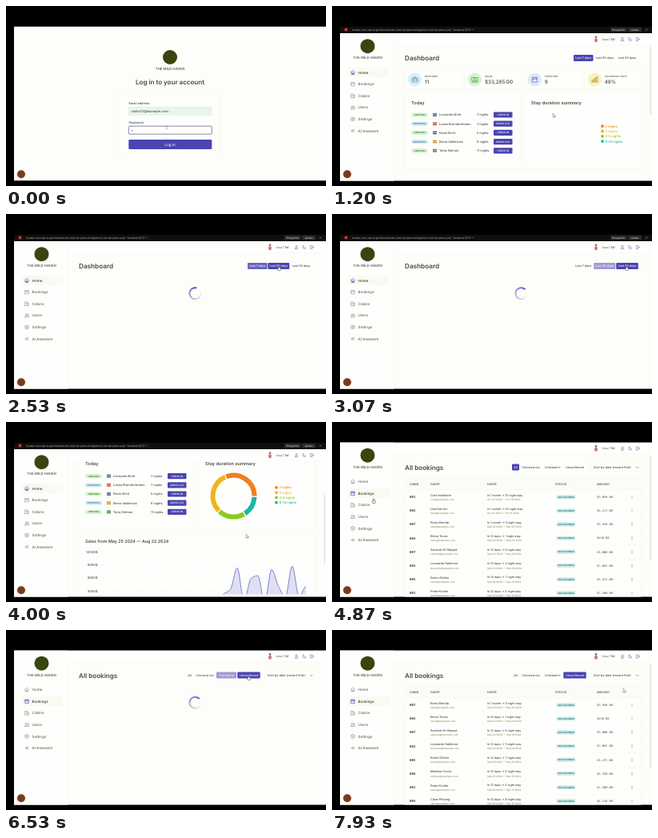
An HTML page for the animation above (8 s loop, 400 by 225 pixels).

```html
<!DOCTYPE html>
<html lang="en">
<head>
<meta charset="utf-8">
<title>Hotel dashboard</title>
<style>
html, body { margin: 0; width: 100%; height: 100%; overflow: hidden; background: #000; }
svg { display: block; width: 100vw; height: 100vh; font-family: Inter, "Open Sans", sans-serif; text-rendering: geometricPrecision; }
.mono { font-family: "Noto Sans Mono", "DejaVu Sans Mono", monospace; }
</style>
</head>
<body>
<script>
const LOOP = 8000, INK = '#4a4a46', SOFT = '#8c8c66', BRAND = '#4a44b0';
const PAGE = '#fdfdf9', CARD = '#fefefc', LINE = '#f5f5ec';

const text = (x, cy, size, str, o = {}) =>
  `<text x="${x}" y="${cy + size * .36}" font-size="${size}" fill="${o.fill || INK}" font-weight="${o.w || 500}"` +
  ` text-anchor="${o.a || 'start'}" class="${o.c || ''}" id="${o.id || ''}">${str}</text>`;
const rect = (x, y, w, h, fill, r = 0, more = '') =>
  `<rect x="${x}" y="${y}" width="${w}" height="${h}" rx="${r}" fill="${fill}" ${more}/>`;
const dot = (x, y, r, fill, more = '') => `<circle cx="${x}" cy="${y}" r="${r}" fill="${fill}" ${more}/>`;
const icon = (x, y, d, color, k = 1) =>
  `<path transform="translate(${x} ${y}) scale(${k})" d="${d}" fill="none" stroke="${color}" stroke-width="${.65 / k}" stroke-linejoin="round"/>`;
const group = (id, body, more = '') => `<g id="${id}" ${more}>${body}</g>`;

const ICONS = {
  home: 'M-2.6 0L0-2.5 2.6 0M-1.9-.5V2.4H1.9V-.5M-.5 2.4V.8H.5V2.4',
  calendar: 'M-2.3-1.9H2.3V2.3H-2.3ZM-2.3-.5H2.3M-1.2-2.6V-1.5M1.2-2.6V-1.5',
  cabin: 'M-2.4 2.4V-2.2H.8V2.4M.8-.8H2.4V2.4H-2.8M-1.3-1H-.4M-1.3.4H-.4',
  users: 'M-.9-2.2a1.1 1.1 0 1 0 .1 0M-2.7 2.2C-2.7-.1.9-.1.9 2.2ZM1.5-1.6a.8.8 0 1 0 .1 0M1.6.5C2.6.5 2.8 1.4 2.8 2.2H1.5',
  gear: 'M0-1a1 1 0 1 0 .1 0M-.5-2.5H.5L1-1.7 2-1.7 2.5-.6 2 0 2.5.6 2 1.7 1 1.7.5 2.5H-.5L-1 1.7-2 1.7-2.5.6-2 0-2.5-.6-2-1.7-1-1.7Z',
  share: 'M1.9-2L-2 0 1.9 2M-2 0H2.4',
  bag: 'M-2.5-1.3H2.5V2.2H-2.5ZM-1-1.3V-2.3H1V-1.3M-2.5.3H2.5',
  cash: 'M-2.8-1.9H2.8V1.3H-2.8ZM0-1.1a.8.8 0 1 0 .1 0M-2.8 2.4H2.8',
  bars: 'M-2.6 2.3V.5H-1.2V2.3ZM-.7 2.3V-.8H.7V2.3ZM1.2 2.3V-2.3H2.6V2.3Z',
  user: 'M0-2.2a1.1 1.1 0 1 0 .1 0M-1.8 2.2C-1.8-.2 1.8-.2 1.8 2.2Z',
  moon: 'M-.6-2.2A2.2 2.2 0 1 0 2.2.7 2.2 2.2 0 0 1-.6-2.2Z',
  exit: 'M.6-1V-2H-2V2H.6V1M-.8 0H2.4M1.5-.9L2.4 0 1.5.9'
};

const brand = (x, y) => dot(x, y, 9, '#39450f') +
  text(x, y + 14.6, 4.3, 'THE MILD HAVEN', { a: 'middle', w: 500 });

// login
const login = rect(10, 25.5, 390, 193, PAGE) + brand(205, 64) +
  text(205, 95.5, 8, 'Log in to your account', { a: 'middle', w: 600 }) +
  rect(142, 110, 126, 77.5, CARD, 1.5, `stroke="${LINE}" stroke-width=".5"`) +
  text(153.5, 121.7, 3.9, 'Email address') +
  rect(153.3, 126, 104, 10.5, '#e9f5e8', 1.2, 'stroke="#e4e4d8" stroke-width=".4"') +
  text(156.5, 131.4, 4.1, 'visitor12@example.com') +
  text(153.5, 145.3, 3.9, 'Password') +
  rect(153.3, 150.2, 104, 10, '#fff', 1.2, 'id="pwBox" stroke-width=".8"') +
  text(156.5, 155.4, 4.4, '', { id: 'pw' }) +
  rect(153.3, 167, 104, 12, BRAND, 1.2) +
  text(205, 173, 4.6, 'Log in', { a: 'middle', fill: '#f4f4ee', id: 'logBtn' }) +
  '<circle id="logSpin" cx="205" cy="173" r="2.6" fill="none" stroke="#eee" stroke-width=".8" stroke-dasharray="11 6"/>';

// sidebar and top bar
const NAV = [['Home', 'home'], ['Bookings', 'calendar'], ['Cabins', 'cabin'], ['Users', 'users'], ['Settings', 'gear'], ['AI Assistant', 'share']];
const navY = i => 83 + i * 14.6;
const nav = on => rect(19.5, navY(on) - 6.2, 52, 12.4, '#fafaf2', 1.5) + NAV.map(([name, ic], i) =>
  icon(26, navY(i), ICONS[ic], i === on ? BRAND : '#96969a') +
  text(32.6, navY(i), 4.5, name, { fill: i === on ? '#3a3a36' : '#66665c' })).join('');
const shell = rect(10, 34, 390, 195, PAGE) + rect(10, 34, 390, 14.5, CARD) + rect(10, 34, 67, 195, CARD) +
  rect(77, 48.3, 323, .5, LINE) + rect(77, 34, .5, 195, LINE) + brand(44.5, 50.2) +
  dot(330, 38.8, 1.4, '#b5566a') + rect(328.2, 40.4, 3.6, 4.8, '#c07a80', 1.4) +
  text(338, 41.5, 3.8, 'Lou / Tal') +
  ['user', 'moon', 'exit'].map((n, i) => icon(363 + i * 9.7, 41.5, ICONS[n], '#7c7cac')).join('') +
  group('navHome', nav(0)) + group('navBook', nav(1));

// filter rows: x, width, label
const DAYS = [[302, 24.5, 'Last 7 days'], [327.3, 27, 'Last 30 days'], [355.2, 27.6, 'Last 90 days']];
const KINDS = [[225, 9, 'All'], [235.3, 26.4, 'Checked out'], [263, 25.2, 'Checked in'], [289.3, 28.4, 'Unconfirmed']];
const filter = (id, list, y) => rect(list[0][0] - 1, y - 5, list.at(-1)[0] + list.at(-1)[1] - list[0][0] + 2, 10, CARD, 1) +
  list.map(([x, w, s], i) => rect(x, y - 4, w, 8, BRAND, 1, `id="${id}${i}"`) +
    text(x + w / 2, y, 3.7, s, { a: 'middle', id: `${id}T${i}` })).join('');

// dashboard
const box = (x, y, w, h) => rect(x, y, w, h, CARD, 1.5, `stroke="${LINE}" stroke-width=".5"`);
const STATS = [['BOOKINGS', 'bag', '#d9eef6', '#2f7fa8'], ['SALES', 'cash', '#d5f5cd', '#2c8a45'],
  ['CHECK INS', 'calendar', '#dcecf4', '#4a5aa6'], ['OCCUPANCY RATE', 'bars', '#f8f2bd', '#b07a1c']];
const stats = STATS.map(([name, ic, bg, fg], i) => {
  const x = 91 + i * 74.9;
  return box(x, 80.5, 70.5, 23) + dot(x + 12.6, 92, 8.6, bg) + icon(x + 12.6, 92, ICONS[ic], fg, 1.35) +
    text(x + 25, 87.8, 3, name, { w: 600, fill: '#6a6a58' }) + text(x + 25, 94.4, 6.3, '', { id: 'stat' + i });
}).join('');
const TODAY = [['Leonardo Brint', 7, '#2d4a8e'], ['Lukas Brennhofmann', 7, '#c93a22'], ['Kevin Brint', 5, '#2d4a8e'],
  ['Elena Valderuez', 8, '#d08a1c'], ['Tariq Selmun', 11, '#2b7a3c']];
const today = TODAY.map(([name, nights, flag], i) => {
  const y = 136 + i * 11.2, out = i % 2;
  return rect(99, y - 2.6, 21, 5.2, out ? '#d3ecf4' : '#d5f3cc', 2.6) +
    text(109.5, y, 2.8, out ? 'DEPARTING' : 'ARRIVING', { a: 'middle', w: 600, fill: out ? '#2f7590' : '#3c8040' }) +
    rect(126, y - 1.8, 5, 3.6, flag) + rect(126, y - .5, 5, 1, '#e9dfc0') +
    text(134, y, 3.9, name) + text(181, y, 3.8, nights + ' nights') +
    rect(202, y - 3.6, 23.5, 7.2, BRAND, 1) +
    text(213.7, y, 3, out ? 'CHECK OUT' : 'CHECK IN', { a: 'middle', w: 600, fill: '#f4f4ee' }) +
    rect(99, y + 5.4, 127, .4, LINE);
}).join('');
const SLICES = [['2 nights', '#f08020', 6], ['3 nights', '#f0b41c', 6], ['4-5 nights', '#8ccc1c', 4], ['8-14 nights', '#1cb8a4', 3]];
const legend = SLICES.map(([s, c], i) => dot(338, 150.2 + i * 6.3, 1.9, c) + text(341.5, 150.2 + i * 6.3, 4, s, { fill: c })).join('');
const slices = SLICES.map(([, c], i) => `<path id="slice${i}" fill="none" stroke="${c}" stroke-width="6"/>`).join('');

const valueY = v => 296 - v * 65.3 / 12000;
function curve(vals) {
  const step = 258 / (vals.length - 1), p = vals.map((v, i) => [117 + i * step, valueY(v)]);
  const slope = i => {
    if (!p[i - 1] || !p[i + 1]) return 0;
    const a = p[i][1] - p[i - 1][1], b = p[i + 1][1] - p[i][1];
    return a * b > 0 ? 2 * a * b / (a + b) : 0;
  };
  return 'M' + p[0] + p.slice(1).map(([x, y], i) =>
    `C${x - step * 2 / 3} ${p[i][1] + slope(i) / 3} ${x - step / 3} ${y - slope(i + 1) / 3} ${x} ${y}`).join('');
}
const area = (vals, line, fill) => `<path d="${curve(vals)}L375 296H117Z" fill="${fill}"/>` +
  `<path d="${curve(vals)}" fill="none" stroke="${line}" stroke-width=".9"/>`;
const chart = (id, total, extra, ticks) => group(id, `<g clip-path="url(#grow)">` +
  area(total, '#7474cc', '#dfe0f4') + area(extra, '#2fb86c', '#d2f0da') + '</g>' +
  ticks.map((s, i) => text(117 + i * 258 / (ticks.length - 1), 300.2, 3.8, s, { a: 'middle' })).join(''));
const WEEK = [500, 5500, 1100, 8450, 4500, 2500, 10735], WEEK_X = [100, 450, 100, 100, 200, 300, 1200];
const LONG = Array.from({ length: 31 }, (_, i) => i < 18 ? 0 : Math.round(4500 + 4200 * Math.sin(i * 2.3)));
const grid = [0, 3000, 6000, 9000, 12000].map(v =>
  `<path d="M117 ${valueY(v)}H375" stroke="#e2e2d8" stroke-width=".4" stroke-dasharray="1.5 1.5"/>` +
  text(114.5, valueY(v), 4, v + '$', { a: 'end' })).join('');
const tip = '<path d="M375 230.7V296" stroke="#ccc" stroke-width=".4"/>' + dot(375, valueY(10735), 1.2, '#6a6ac4') +
  rect(326, 243, 45.5, 29.5, '#fefefb', 0, 'stroke="#ececdf" stroke-width=".4"') +
  text(329.5, 249.3, 4.2, 'Aug 22') + text(329.5, 256.4, 4.2, 'Total sales : 10735$', { fill: '#6c6cc0' }) +
  text(329.5, 265, 4.2, 'Extras sales : 1200$', { fill: '#2fae54' });
const dash = group('dashScroll',
  text(91, 65, 8.2, 'Dashboard', { w: 600 }) + filter('day', DAYS, 65) +
  group('dashData', stats + box(91, 107.5, 145.5, 95.5) + text(99, 120.6, 5.6, 'Today', { w: 600 }) + today +
    box(240.8, 107.5, 145.5, 95.5) + text(249, 120.6, 5.6, 'Stay duration summary', { w: 600 }) + legend + slices +
    box(91, 207.5, 295.3, 100) + text(99, 217.7, 5.35, '', { w: 600, id: 'salesTitle' }) + grid +
    chart('week', WEEK, WEEK_X, [16, 17, 18, 19, 20, 21, 22].map(d => 'Aug ' + d)) +
    chart('long', LONG, LONG.map(v => v / 9), ['May 25', 'Jun 14', 'Jul 04', 'Jul 24', 'Aug 22']) + group('tip', tip)));

// bookings: cabin, guest, mail, when, nights, dates, amount
const GUESTS = [
  ['001', 'Cora Hallmore', 'cora', '1 month', 15, 'Oct 03 2024 — Oct 18 2024', '$9,050.00'],
  ['002', 'Lisa Darvon', 'lisad', '1 month', 10, 'Oct 01 2024 — Oct 11 2024', '$6,115.00'],
  ['007', 'Kenu Morida', 'kenu', '1 month', 6, 'Sep 22 2024 — Sep 28 2024', '$3,950.00'],
  ['004', 'Elena Tovez', 'elena', '10 days', 1, 'Sep 03 2024 — Sep 04 2024', '$450.00'],
  ['007', 'Samirah Al-Naqed', 'samirah', '12 days', 6, 'Sep 04 2024 — Sep 10 2024', '$3,000.00'],
  ['002', 'Leonardo Hallmore', 'leonardo', '10 days', 3, 'Sep 03 2024 — Sep 06 2024', '$1,065.00'],
  ['005', 'Karim Dellan', 'karim', '14 days', 7, 'Sep 06 2024 — Sep 13 2024', '$3,475.00'],
  ['006', 'Mathias Corva', 'mathias', '12 days', 5, 'Sep 05 2024 — Sep 10 2024', '$2,350.00'],
  ['001', 'Peter Kroller', 'peter', '12 days', 5, 'Sep 05 2024 — Sep 10 2024', '$1,500.00'],
  ['004', 'Clara Phuong', 'clara', '13 days', 8, 'Sep 05 2024 — Sep 13 2024', '$4,150.00']];
const TAGS = { UNCONFIRMED: ['#cdeeea', '#2d7a78'], 'CHECKED IN': ['#d5f3cc', '#3c8040'], 'CHECKED OUT': ['#e6e6de', '#66665a'] };
const table = (id, order, tag) => group(id, order.map((n, i) => {
  const [cabin, guest, mail, when, nights, dates, amount] = GUESTS[n], y = 93.7 + i * 17.15;
  const [bg, fg] = TAGS[tag];
  return text(97, y, 4.1, cabin, { c: 'mono', w: 600 }) +
    text(123, y - 2.4, 3.8, guest) + text(123, y + 3, 3.1, mail + '@example.com', { fill: SOFT }) +
    text(194, y - 2.4, 3.6, tag === 'UNCONFIRMED' ? `In ${when} → ${nights} night stay` : `${when} ago → ${nights} night stay`) +
    text(194, y + 3, 3.1, dates, { fill: SOFT }) + rect(280.5, y - 2.7, 24, 5.4, bg, 2.7) +
    text(292.5, y, 2.8, tag, { a: 'middle', w: 600, fill: fg }) + text(331, y, 3.7, amount, { c: 'mono' }) +
    [-1.5, 0, 1.5].map(d => dot(375, y + d, .5, '#77775c')).join('') + rect(91, y + 8.4, 295, .4, LINE);
}).join(''));
const book = text(91, 56.6, 8.1, 'All bookings', { w: 600 }) + filter('kind', KINDS, 56.6) +
  rect(323.5, 51.8, 62.5, 9.6, CARD, 1, `stroke="${LINE}" stroke-width=".4"`) +
  text(327, 56.6, 3.9, 'Sort by date (recent first)') + '<path d="M380 56L381.5 57.5 383 56" fill="none" stroke="#555" stroke-width=".6"/>' +
  group('bookData', box(91, 70, 295, 160) + rect(91.3, 70.3, 294.4, 14.4, '#fcfcf6') +
    [[97, 'CABIN'], [123, 'GUEST'], [194, 'DATES'], [279, 'STATUS'], [331, 'AMOUNT']]
      .map(([x, s]) => text(x, 77.4, 3.6, s, { w: 600, fill: '#5a5a4c' })).join('') + rect(91, 84.8, 295, .4, LINE) +
    table('rows0', [0, 1, 2, 3, 4, 5, 6, 8], 'UNCONFIRMED') + table('rows1', [7, 9, 5, 0, 3, 6, 2, 1], 'CHECKED OUT') +
    table('rows2', [8, 1, 4, 6, 9, 2, 0, 3], 'CHECKED IN') + table('rows3', [2, 3, 4, 5, 6, 7, 8, 9], 'UNCONFIRMED'));

const banner = rect(10, 25.5, 390, 8.3, '#120e0e') + dot(17.5, 29.6, 2, '#d23a2a') +
  text(25, 29.7, 3.15, 'Voulez-vous que le gestionnaire des mots de passe enregistre le mot de passe pour "localhost:5173" ?', { fill: '#c8bcac', w: 400 }) +
  [[348, 20.5, 'Enregistrer'], [370, 17, 'Jamais']].map(([x, w, s]) => rect(x, 26.8, w, 5.6, '#2c2928', 1) +
    text(x + w / 2, 29.6, 3.1, s, { a: 'middle', fill: '#ddd8c4' })).join('') +
  '<path d="M392 28.6L394 30.6M394 28.6L392 30.6" stroke="#bbb" stroke-width=".5"/>';

const polar = (r, deg) => [r * Math.cos(deg * Math.PI / 180), r * Math.sin(deg * Math.PI / 180)];
const spinner = Array.from({ length: 40 }, (_, i) =>
  `<path d="M${polar(7, i * 8.1 - 90 - 324)}A7 7 0 0 1 ${polar(7, i * 8.1 - 90 - 315.5)}" fill="none" stroke="${BRAND}" stroke-width="1.9" opacity="${(i / 39) ** 1.3}"/>`).join('');

const cursors = group('arrow', '<path d="M0 0V5L1.2 3.9 2 5.6 2.8 5.2 2 3.6H3.6Z" fill="#fff" stroke="#444" stroke-width=".4"/>') +
  group('hand', '<path d="M-.6 0Q0-.8.6 0V2L2.4 2.5Q2.8 4.4 1.8 5.6H-.8L-2 3.4-1.4 3-.6 3.7Z" fill="#fff" stroke="#333" stroke-width=".5"/>') +
  group('beam', '<path d="M-.8-1.8H.8M0-1.8V1.8M-.8 1.8H.8" stroke="#555" stroke-width=".4"/>');

document.body.insertAdjacentHTML('afterbegin', `<svg viewBox="0 0 400 225"><defs>
  <clipPath id="screen"><rect x="10" y="25.5" width="390" height="193"/></clipPath>
  <clipPath id="main"><rect x="77" y="48.8" width="323" height="166.6"/></clipPath>
  <clipPath id="grow"><rect id="growBox" x="116" y="225" width="260" height="73"/></clipPath></defs>
  <rect width="400" height="225"/><g clip-path="url(#screen)">` +
  group('login', login) +
  group('app', group('shell', shell + group('dash', dash, 'clip-path="url(#main)"')) + group('book', book) +
    group('spin', spinner) + rect(397.4, 0, 1.4, 90, '#dedede', .7, 'id="thumb"')) +
  group('banner', banner) + dot(19, 210.3, 5, '#7a3a1e') + cursors + '</g></svg>');

const el = {};
document.querySelectorAll('[id]').forEach(e => { if (e.id) el[e.id] = e; });
const show = (id, on) => { el[id].style.display = on ? '' : 'none'; };
const set = (id, k, v) => el[id].setAttribute(k, v);
const say = (id, s) => { if (el[id].textContent !== s) el[id].textContent = s; };
const clamp = v => Math.max(0, Math.min(1, v));
const ease = v => v * v * (3 - 2 * v);
const within = (t, a, b) => t >= a && t < b;
const last = (list, t) => list.findLastIndex(e => e[0] <= t);
function tween(list, t) {
  const i = Math.max(0, last(list, t)), a = list[i], b = list[i + 1] || a;
  const k = b === a ? 0 : ease(clamp((t - a[0]) / (b[0] - a[0])));
  return a.slice(1).map((v, j) => v + (b[j + 1] - v) * k);
}

const MOUSE = [[0, 201, 152], [200, 201, 152], [400, 207, 173], [800, 207, 173], [1150, 276, 134], [1500, 277, 134],
  [1920, 366, 160], [2060, 361, 125], [2250, 361, 125], [2460, 341, 65], [2850, 341, 65], [2960, 368, 65], [3250, 368, 65],
  [3500, 300, 140], [4100, 300, 140], [4230, 393, 29], [4290, 393, 29], [4450, 52, 96], [5000, 52, 96], [5270, 249, 57],
  [5750, 249, 57], [5860, 276, 57], [6300, 276, 57], [6420, 303, 57], [6900, 303, 57], [7300, 364, 73]];
const SCROLL = [[0, 0], [1550, 0], [1880, 85], [2200, 85], [2420, 0], [3550, 0], [3780, 85], [3950, 85], [4130, 0]];
const DAY_CLICKS = [[0, 0], [2500, 1], [2990, 2]], KIND_CLICKS = [[0, 0], [5330, 1], [5900, 2], [6450, 3]];
const LOADING = [[750, 1070], [2500, 2800], [2990, 3330], [4480, 4700], [5330, 5600], [5900, 6150], [6450, 6800]];
const NUMBERS = [['11', '$33,285.00', '9', '48%'], ['19', '$52,410.00', '14', '21%'], ['24', '$71,970.00', '17', '9%']];

function paintFilter(id, clicks, t) {
  const now = last(clicks, t), ahead = last(clicks, t + 100);
  for (let i = 0; i < clicks.length; i++) {
    let w = i === clicks[now][1] ? 1 : 0;
    if (now > 0 && i === clicks[now - 1][1]) w = 1 - clamp((t - clicks[now][0]) / 170);
    if (ahead > now && i === clicks[ahead][1]) w = clamp((t + 100 - clicks[ahead][0]) / 100);
    set(id + i, 'opacity', w);
    set(`${id}T${i}`, 'fill', w > .3 ? '#f4f4ee' : INK);
  }
  return now;
}

function paintPie(k) {
  const total = SLICES.reduce((s, e) => s + e[2], 0);
  let from = 0;
  SLICES.forEach(([, , n], i) => {
    const to = from + n / total * 360 * k, end = Math.max(from, to - 3 * k);
    const a = polar(26, -from), b = polar(26, -end);
    set('slice' + i, 'd', k ? `M${284.5 + a[0]} ${161 + a[1]}A26 26 0 ${end - from > 180 ? 1 : 0} 0 ${284.5 + b[0]} ${161 + b[1]}` : '');
    from = to;
  });
}

function draw(t) {
  const inApp = t >= 750, hasBanner = within(t, 730, 4280), onBook = t >= 4480;
  const busy = LOADING.some(([a, b]) => within(t, a, b)), loaded = LOADING.findLast(e => e[1] <= t)?.[1] || 0;
  const dy = hasBanner ? 0 : -8.5, scroll = tween(SCROLL, t)[0];

  show('login', !inApp);
  show('app', inApp);
  show('banner', hasBanner);
  say('pw', '•'.repeat(Math.min(8, 1 + Math.floor(t / 45))));
  set('pwBox', 'stroke', t < 420 ? '#6c6a90' : '#e4e4d8');
  show('logBtn', t < 470);
  show('logSpin', t >= 470);
  set('logSpin', 'transform', `rotate(${t * .73} 205 173)`);

  set('shell', 'transform', `translate(0 ${dy})`);
  show('navHome', !onBook);
  show('navBook', onBook);
  show('dash', !onBook);
  show('book', onBook);
  show('spin', busy);
  set('spin', 'transform', `translate(236.5 ${99.3 + dy}) rotate(${45 + (t - 3070) / 494 * 360})`);

  const day = paintFilter('day', DAY_CLICKS, t), kind = paintFilter('kind', KIND_CLICKS, t);
  show('dashData', !busy);
  set('dashScroll', 'transform', `translate(0 ${-scroll})`);
  NUMBERS[day].forEach((s, i) => say('stat' + i, s));
  say('salesTitle', `Sales from ${['Aug 16', 'Jul 24', 'May 25'][day]} 2024 — Aug 22 2024`);
  show('week', day === 0);
  show('long', day > 0);
  const grown = ease(clamp((t - loaded - 180) / 450));
  paintPie(grown);
  set('growBox', 'width', 260 * grown);
  show('tip', within(t, 1900, 2150));

  show('bookData', !busy);
  for (let i = 0; i < 4; i++) show('rows' + i, i === kind);
  show('thumb', !busy);
  set('thumb', 'y', onBook ? 42 : 50 + dy + scroll * .6);
  set('thumb', 'height', onBook ? 130 : 86);

  const [x, y] = tween(MOUSE, t);
  const shape = t < 250 ? 'beam' : [[380, 800], [2440, 2880], [2940, 3270], [4430, 5030], [5240, 5760], [5850, 6310], [6410, 6920]]
    .some(([a, b]) => within(t, a, b)) ? 'hand' : 'arrow';
  for (const id of ['arrow', 'hand', 'beam']) {
    show(id, id === shape);
    set(id, 'transform', `translate(${x} ${y})`);
  }
}

const start = performance.now();
function tick() {
  draw((performance.now() - start) % LOOP);
  requestAnimationFrame(tick);
}
draw(0);
requestAnimationFrame(tick);
</script>
</body>
</html>
```
